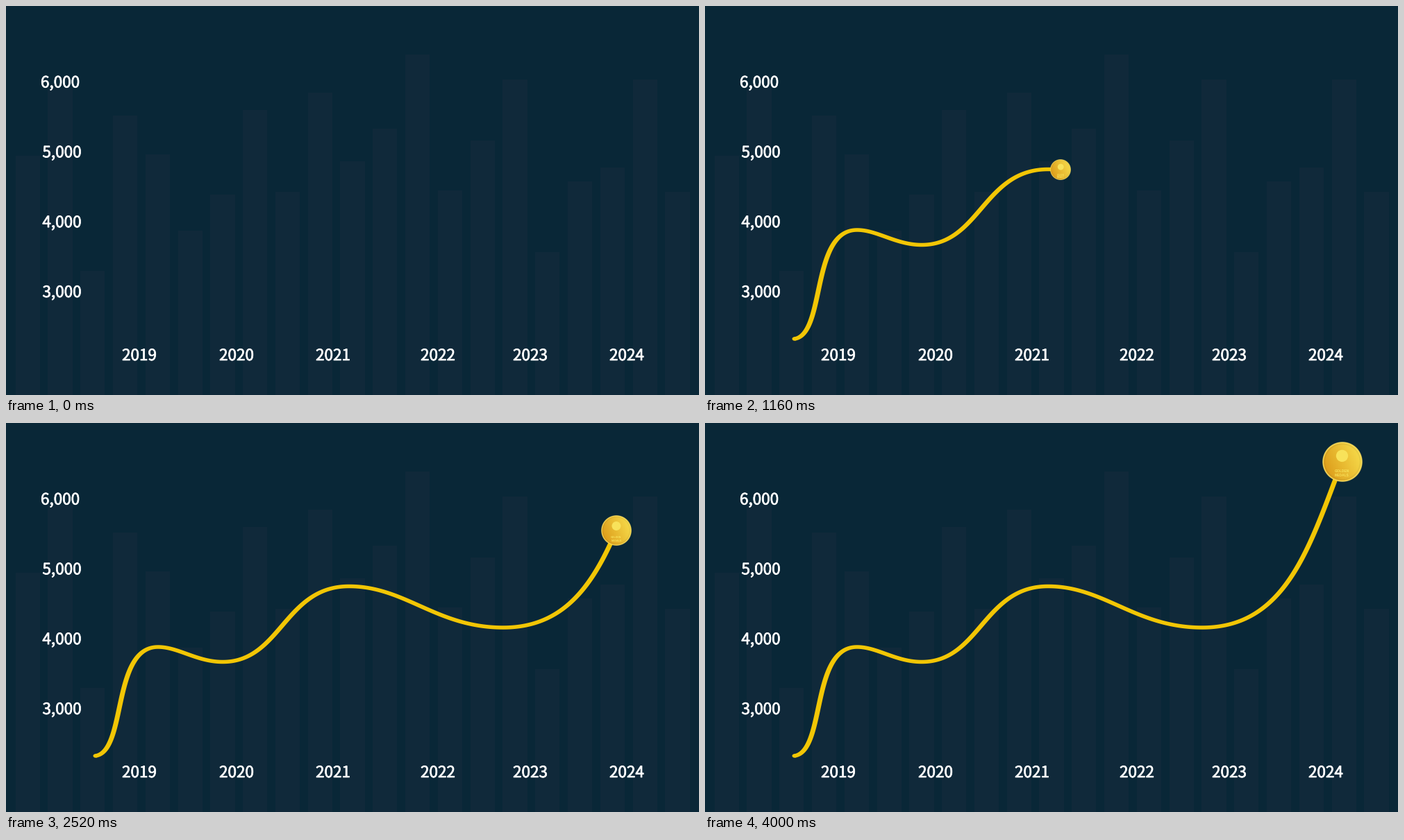
A matplotlib script that plays this animation: 998x561 px, repeating every 5480 ms.

```python
import numpy as np
import matplotlib.pyplot as plt
from matplotlib.animation import FuncAnimation
from matplotlib.patches import Circle, Ellipse, Polygon, Rectangle
from matplotlib.patheffects import withStroke

W, H, DPI = 998, 561, 64
STEP, LOOP, RUN = 40, 5480, 4000  # ms
BACK, BAR, GOLD, SHINE = "#092737", "#10293a", "#f2c605", "#f8e25a"
PEN = np.array([3.5, 2.75])  # half widths of the slightly stretched pen


def pt(px):
    return px * 72 / DPI


def bezier(points, n=150):
    a, b, c, d = np.array(points, float)
    t = np.linspace(0, 1, n)[:, None]
    u = 1 - t
    return u**3 * a + 3 * u * u * t * b + 3 * u * t * t * c + t**3 * d


# Growth curve: every third point is a knot, the others are handles
PATH = [(129, 480), (174, 473), (152, 323),
        (219, 323), (248, 323), (275, 344.5),
        (312, 344.5), (396, 344.5), (401, 235.5),
        (494, 235.5), (575, 235.5), (620, 295),
        (716, 295), (838, 295), (871, 176), (917.5, 56)]
curve = np.vstack([bezier(PATH[i:i + 4])[i > 0:]
                   for i in range(0, len(PATH) - 1, 3)])
arc = np.r_[0, np.cumsum(np.hypot(*np.diff(curve, axis=0).T))]

# Quick start, long soft landing
EASE = bezier([(0, 0), (0.225, 0), (0.228, 1), (1, 1)], 600)


def stroke(points):
    """Outline swept by an elliptical pen along the points."""
    dx, dy = np.gradient(points, axis=0).T
    normal = np.c_[-dy, dx] * PEN
    off = PEN * normal / np.hypot(*normal.T)[:, None]
    return np.vstack([points + off, (points - off)[::-1]])


def coin_image(n=180):
    y, x = np.mgrid[-1:1:n * 1j, -1:1:n * 1j]
    r = np.hypot(x, y)
    mix = np.clip(0.5 + 0.5 * x - 0.22 * y, 0, 1)[..., None]
    rgb = (1 - mix) * np.array([221, 158, 28]) + mix * np.array([245, 216, 72])
    rgb[(r > 0.86) & (r < 0.91)] *= 0.94
    rgb[r > 0.94] = (247, 218, 92)
    alpha = np.clip((1 - r) * n / 2, 0, 1)
    return np.dstack([np.clip(rgb / 255, 0, 1), alpha])


fig = plt.figure(figsize=(W / DPI, H / DPI), dpi=DPI, facecolor=BACK)
ax = fig.add_axes([0, 0, 1, 1])
ax.axis("off")
coin = ax.imshow(coin_image(), extent=(0, 1, 1, 0), aspect="auto",
                 interpolation="hanning", zorder=5)
ax.set_xlim(0, W)
ax.set_ylim(H, 0)

# Faint backdrop bars
TOPS = [216, 118, 382, 158, 214, 324, 272, 150, 268, 125, 224,
        177, 70, 266, 194, 106, 355, 253, 233, 106, 268]
for i, top in enumerate(TOPS):
    ax.add_patch(Rectangle((13.7 + 46.78 * i, top), 35.2, H - top,
                           fc=BAR, lw=0, zorder=1))


def label(x, y, text):
    ax.text(x, y, text, color="white", ha="center", va="baseline",
            family="Noto Sans CJK JP", size=pt(22.5), zorder=2,
            path_effects=[withStroke(linewidth=pt(0.7), foreground="white")])


for i, x in enumerate([78, 80.5, 80.5, 80.5]):
    label(x, 117.5 + 100.8 * i, f"{6000 - 1000 * i:,}")
for year, x in enumerate([192, 332, 471, 622, 755, 894], 2019):
    label(x, 511, str(year))

line = ax.add_patch(Polygon(curve[:3], fc=GOLD, lw=0, zorder=3))
cap = ax.add_patch(Ellipse(curve[0], *(2 * PEN), fc=GOLD, lw=0, zorder=3))
emblem = ax.add_patch(Circle((0, 0), 1, fc=SHINE, lw=0, zorder=6))
words = [ax.text(0, 0, w, color=SHINE, ha="center", va="center",
                 family="Liberation Sans", weight="bold", zorder=6)
         for w in ("GOLDEN", "MEDALS")]
moving = [line, cap, coin, emblem, *words]


def draw(frame):
    t = min(frame * STEP, RUN)
    for part in moving:
        part.set_visible(t > 0)
    if t == 0:
        return moving

    s = arc[-1] * np.interp(t / RUN, *EASE.T)
    x, y = (np.interp(s, arc, axis) for axis in curve.T)
    line.set_xy(stroke(np.vstack([curve[arc < s - 0.01], (x, y)])))

    # The coin pops in, then grows steadily
    r = (9.2 + 0.0049 * t) * min(1, t / 200)
    coin.set_extent((x - r, x + r, y + r, y - r))
    emblem.center = (x, y - 0.3 * r)
    emblem.set_radius(0.3 * r)
    for word, drop in zip(words, (0.47, 0.68)):
        word.set_position((x, y + drop * r))
        word.set_fontsize(pt(max(0.17 * r, 1)))
    return moving


anim = FuncAnimation(fig, draw, frames=LOOP // STEP, interval=STEP,
                     init_func=lambda: draw(0), repeat=True, repeat_delay=0)
plt.show()
```
